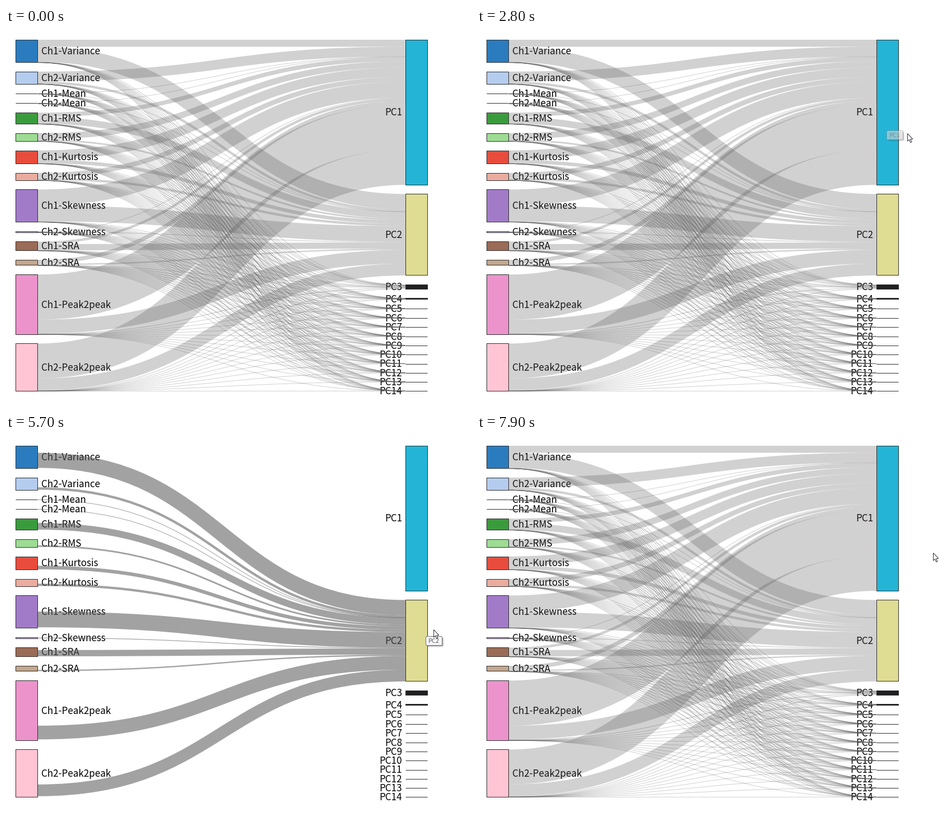
Recreate the animation shown at these times as a matplotlib script. Size 830 by 675 pixels, loop 8 s.

```python
import numpy as np
import matplotlib.pyplot as plt
from matplotlib.animation import FuncAnimation
from matplotlib.patches import FancyBboxPatch, PathPatch, Polygon, Rectangle
from matplotlib.path import Path

W, H, DPI = 830, 675, 100
STEP, FRAMES = 100, 80
PX = 72 / DPI
FONT, TEXT_SIZE = "Noto Sans CJK JP", 17
DARK = "#303030"
LINK = (90 / 255,) * 3
REST, ACTIVE = 0.273, 0.565
LEFT_X, RIGHT_X, NODE_W, TOP, PAD = 17, 713, 40, 21, 16.28
COUNT = 14

FEATURES = ["Variance", "Mean", "RMS", "Kurtosis", "Skewness", "SRA", "Peak2peak"]
SOURCE_NAMES = [f"Ch{c}-{name}" for name in FEATURES for c in (1, 2)]
TARGET_NAMES = [f"PC{k + 1}" for k in range(COUNT)]
SOURCE_COLORS = ["#2a7cbf", "#b4cdef", "#f08a30", "#f5b8a8", "#3a9b3c", "#9edc95",
                 "#e84c3d", "#ebaca0", "#a27bc8", "#d9c4e8", "#9a6b57", "#c3a78f",
                 "#ec93cc", "#ffc5d5"]
TARGET_COLORS = ["#24b4d6", "#dfdc93"] + ["#202022"] * (COUNT - 2)

TO_PC1 = [12.5, 17.3, 0.6, 0.6, 7.5, 11, 16.7, 8.6, 28.8, 0.9, 4.4, 7.2, 80.6, 62.4]
TO_PC2 = [27, 4.3, 0.3, 0.3, 12, 2.9, 6.3, 4.2, 28, 1.2, 11.2, 2.3, 24.5, 21]

# time in ms, pointer x, pointer y
POINTER = np.array([
    (1000, 822, 178), (1300, 746, 172), (1500, 724, 174),
    (2500, 724, 174), (2800, 768, 188), (3000, 768, 188),
    (3400, 744, 326), (3800, 772, 350), (4000, 772, 350),
    (4300, 755, 348), (4500, 742, 353), (5600, 742, 353),
    (5700, 763, 349), (5900, 782, 375), (6500, 766, 458),
    (6600, 757, 458), (6900, 740, 463), (7500, 740, 463), (7900, 814, 212),
])

fig = plt.figure(figsize=(W / DPI, H / DPI), dpi=DPI, facecolor="white")
ax = fig.add_axes([0, 0, 1, 1])
ax.set_xlim(0, W)
ax.set_ylim(H, 0)
ax.axis("off")


def flow_matrix():
    """Flows by source and target; the minor components decay geometrically."""
    major = np.column_stack([TO_PC1, TO_PC2])
    share = np.sqrt(major.sum(axis=1))
    minor = 8 * 0.28 ** np.arange(COUNT - 2)
    return np.hstack([major, np.outer(share / share.sum(), minor)])


def stack(heights):
    return TOP + np.cumsum(heights + PAD) - heights - PAD


def add_text(x, y, label, size, **style):
    style = {"color": "black", "zorder": 1, **style}
    return ax.text(x, y + 0.35 * size, label, fontsize=size * PX, family=FONT,
                   va="baseline", **style)


def add_node(x, top, height, color):
    """Draw a node whose outline sits on whole pixels."""
    first = round(top)
    last = max(first, int(top + height))
    ax.add_patch(Rectangle((x + 0.5, first + 0.5), NODE_W - 1, last - first,
                           fc=color, ec=DARK, lw=PX, snap=False, zorder=3))


def add_link(y0, y1, width):
    x0, x1 = LEFT_X + NODE_W, RIGHT_X
    mid = (x0 + x1) / 2
    path = Path([(x0, y0), (mid, y0), (mid, y1), (x1, y1)],
                [Path.MOVETO] + [Path.CURVE4] * 3)
    return ax.add_patch(PathPatch(path, fill=False, ec=LINK, alpha=REST,
                                  lw=max(width, 1) * PX, zorder=2))


class Tooltip:
    def __init__(self, label, x, y, start, end):
        self.start, self.end = start, end
        self.parts = []
        for shift, strength in ((3, 0.12), (1.5, 0.25)):
            self.add_box(x + shift, y + shift, "black", "none", strength)
        self.add_box(x, y, "#f6f6f8", "#777777", 1)
        text = add_text(x + 14.5, y + 8.3, label, 11, ha="center",
                        color="#606060", zorder=6)
        self.parts.append((text, 1))

    def add_box(self, x, y, face, edge, strength):
        box = FancyBboxPatch((x + 0.5, y + 0.5), 29, 16, fc=face, ec=edge, lw=PX,
                             boxstyle="round,pad=0,rounding_size=2", zorder=5)
        self.parts.append((ax.add_patch(box), strength))

    def update(self, t):
        level = min(np.clip((t - self.start) / 250, 0, 1),
                    np.clip((self.end - t) / 200, 0, 1))
        for part, strength in self.parts:
            part.set_visible(level > 0)
            part.set_alpha(level * strength)


def move_shape():
    """Four-way arrow, one arm turned by quarter circles."""
    arm = np.array([(-1.4, -1.4), (-1.4, -5.5), (-4, -5.5), (0, -9.5),
                    (4, -5.5), (1.4, -5.5)])
    turns = []
    for _ in range(4):
        turns.append(arm)
        arm = np.column_stack([-arm[:, 1], arm[:, 0]])
    return np.vstack(turns)


ARROW = np.array([(0, 0), (0, 13.5), (3, 10.8), (5.2, 16), (7.4, 15),
                  (5.2, 10), (9.2, 9.7)]) + 0.5
MOVE = move_shape()


def pointer_at(t):
    if t < POINTER[0, 0]:
        return None
    return np.array([np.interp(t, POINTER[:, 0], POINTER[:, c]) for c in (1, 2)])


def hovered(pos):
    if pos is None or not RIGHT_X <= pos[0] <= RIGHT_X + NODE_W:
        return None
    inside = (target_tops <= pos[1]) & (pos[1] <= target_tops + target_heights)
    return int(inside.argmax()) if inside.any() else None


flows = flow_matrix()
source_heights, target_heights = flows.sum(axis=1), flows.sum(axis=0)
source_tops, target_tops = stack(source_heights), stack(target_heights)

for name, top, height, color in zip(SOURCE_NAMES, source_tops, source_heights,
                                    SOURCE_COLORS):
    add_node(LEFT_X, top, height, color)
    add_text(63, top + height / 2, name, TEXT_SIZE)
for name, top, height, color in zip(TARGET_NAMES, target_tops, target_heights,
                                    TARGET_COLORS):
    add_node(RIGHT_X, top, height, color)
    add_text(707, top + height / 2, name, TEXT_SIZE, ha="right")

# Middle of each flow within its source and within its target.
leave = source_tops[:, None] + np.cumsum(flows, axis=1) - flows / 2
arrive = target_tops + np.cumsum(flows, axis=0) - flows / 2
links = [(k, add_link(leave[s, k], arrive[s, k], flows[s, k]))
         for s in range(COUNT) for k in range(COUNT)]

tips = [Tooltip("PC1", 731, 183, 1700, 2900),
        Tooltip("PC2", 749, 361, 4600, 6000),
        Tooltip("PC3", 747, 473, 7050, 7900)]
cursor = ax.add_patch(Polygon(ARROW, fc="white", ec="#303040", lw=PX, zorder=8))


def update(frame):
    t = frame * STEP
    pos = pointer_at(t)
    over = hovered(pos)
    # The highlight lingers one step after the pointer leaves a node.
    active = over if over is not None else hovered(pointer_at(t - STEP))
    for k, link in links:
        link.set_visible(active is None or k == active)
        link.set_alpha(REST if active is None else ACTIVE)
    for tip in tips:
        tip.update(t)
    cursor.set_visible(pos is not None)
    if pos is not None:
        cursor.set_xy(pos + (ARROW if over is None else MOVE))


anim = FuncAnimation(fig, update, frames=FRAMES, interval=STEP, repeat=True,
                     repeat_delay=0)
plt.show()
```
